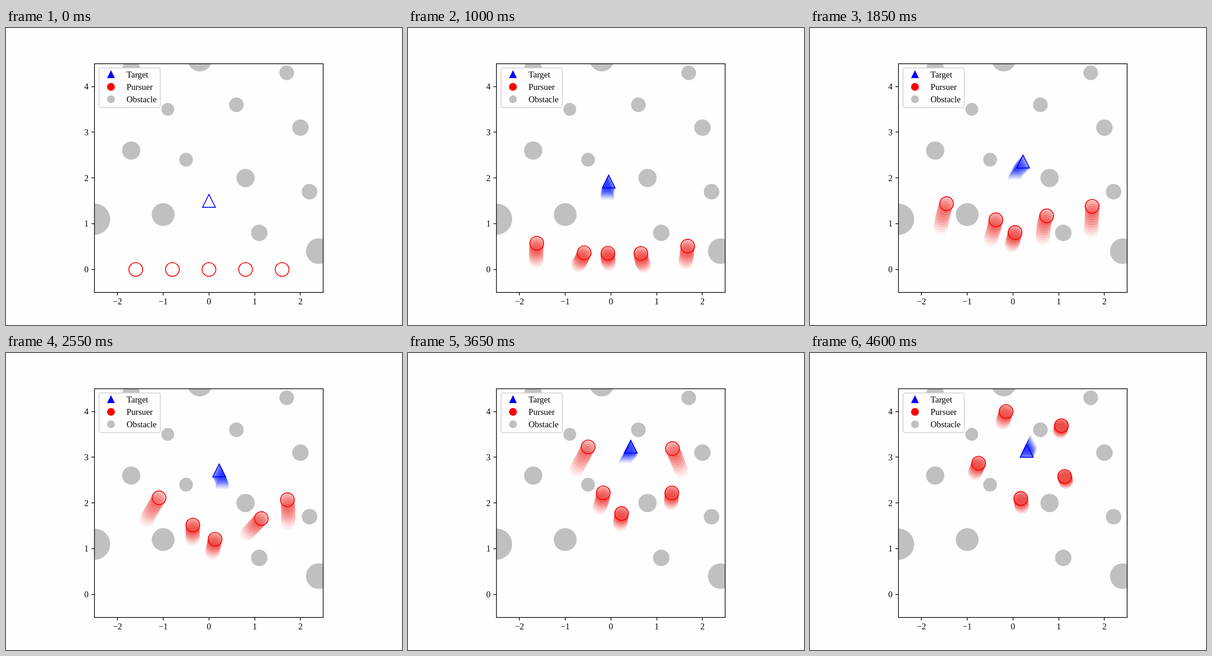
Recreate the animation shown at these times as an HTML page with a canvas. Size 864 by 648 pixels, loop 4.65 s.

```html
<!DOCTYPE html>
<html lang="en">
<head>
<meta charset="utf-8">
<title>Pursuit</title>
<style>
  html, body { margin: 0; width: 100%; height: 100%; overflow: hidden; background: #fefefe; }
  canvas { display: block; }
</style>
</head>
<body>
<canvas id="stage" width="864" height="648"></canvas>
<script>
const ctx = document.getElementById('stage').getContext('2d');

const FRAME_MS = 50, FRAMES = 93, TRAIL = 10, LINE = 1.875;
const CUT = 89, SKIP = 34; // the run jumps ahead at this frame
const LAST_STEP = FRAMES - 1 + SKIP;
const UNIT = 99.792, LEFT = 193, TOP = 78, SIDE = 499;
const GRAY = '#c0c0c0', PAPER = '#fefefe';
const px = x => 442.8 + x * UNIT;
const py = y => 526.82 - y * UNIT;

// Plot units: x, y, radius
const obstacles = [
  [-1, 1.2, .25], [-.5, 2.4, .15], [.8, 2, .2], [1.1, .8, .18], [2.2, 1.7, .17],
  [2, 3.1, .18], [1.7, 4.3, .16], [.6, 3.6, .16], [-.9, 3.5, .14], [-1.7, 2.6, .2],
  [-2.5, 1.1, .34], [2.4, .4, .28], [-.2, 4.6, .27], [-1.7, 4.4, .19]
];

const evader = {
  shape: triangle, size: 14.06, color: '#00f', trailColor: '#0a1eff', opacity: .28,
  path: [[0, 1.5], [-.08, 1.77], [.04, 2.14], [.29, 2.48], [.2, 2.84],
    [.42, 3.18], [.41, 3.36], [.41, 3.4], [.41, 3.4], [.3, 3.14]]
};

// Key points that follow each pursuer's start on the baseline
const pursuers = [
  [[-1.63, .49], [-1.47, 1.39], [-1.01, 2.26], [-.52, 3.18], [-.22, 3.88], [-.27, 3.64], [-.15, 4]],
  [[-.61, .3], [-.38, 1.05], [-.34, 1.61], [-.17, 2.19], [-.25, 2.71], [-.82, 2.54], [-.75, 2.87]],
  [[-.07, .31], [.04, .78], [.15, 1.29], [.23, 1.75], [.23, 1.99], [.21, 1.82], [.17, 2.1]],
  [[.66, .28], [.72, 1.13], [1.21, 1.75], [1.33, 2.2], [1.25, 2.5], [1.19, 2.4], [1.13, 2.58]],
  [[1.67, .43], [1.73, 1.33], [1.69, 2.22], [1.36, 3.15], [1.12, 3.66], [1.02, 3.5], [1.06, 3.69]]
].map((points, i) => ({
  shape: circle, size: 15, color: '#f00', trailColor: '#eb1a14', opacity: .2,
  path: [[.8 * (i - 2), 0], ...points]
}));

// Smooth curve through key points spread evenly over the run, starting from rest
function position(path, step) {
  const last = path.length - 1, t = step / LAST_STEP * last;
  const i = Math.min(Math.floor(t), last - 1), u = t - i, w = 1 - u;
  const tangent = (k, axis) => {
    if (k === 0) return 0;
    if (k === last) return path[k][axis] - path[k - 1][axis];
    return (path[k + 1][axis] - path[k - 1][axis]) / 2;
  };
  return [0, 1].map(axis =>
    path[i][axis] * w * w * (1 + 2 * u) + path[i + 1][axis] * u * u * (3 - 2 * u)
    + u * w * (w * tangent(i, axis) - u * tangent(i + 1, axis)));
}

function circle(x, y, r) {
  ctx.beginPath();
  ctx.arc(x, y, r, 0, 2 * Math.PI);
}

function triangle(x, y, r) {
  ctx.beginPath();
  ctx.moveTo(x, y - r);
  ctx.lineTo(x - r, y + r);
  ctx.lineTo(x + r, y + r);
  ctx.closePath();
}

function fill(color) {
  ctx.fillStyle = color;
  ctx.fill();
}

function stroke(color, width = LINE) {
  ctx.strokeStyle = color;
  ctx.lineWidth = width;
  ctx.stroke();
}

function text(label, x, y, align) {
  ctx.fillStyle = '#000';
  ctx.textAlign = align;
  ctx.fillText(label, x, y);
}

function drawObstacles() {
  ctx.save();
  ctx.beginPath();
  ctx.rect(LEFT, TOP, SIDE, SIDE);
  ctx.clip();
  for (const [x, y, r] of obstacles) {
    circle(px(x), py(y), r * UNIT);
    fill(GRAY);
  }
  ctx.restore();
}

function drawAxes() {
  const bottom = TOP + SIDE;
  ctx.beginPath();
  ctx.rect(LEFT, TOP, SIDE, SIDE);
  for (let v = -2; v <= 2; v++) {
    const x = Math.round(px(v));
    ctx.moveTo(x, bottom);
    ctx.lineTo(x, bottom + 6.5);
    text(String(v).replace('-', '\u2212'), px(v), 603, 'center');
  }
  for (let v = 0; v <= 4; v++) {
    const y = Math.round(py(v));
    ctx.moveTo(LEFT, y);
    ctx.lineTo(LEFT - 6.5, y);
    text(v, 180.2, py(v) + 6.3, 'right');
  }
  stroke('#000', 1.5);
}

function drawLegend() {
  ctx.beginPath();
  ctx.roundRect(203, 87.2, 133.6, 86.6, 3.75);
  fill(PAPER);
  stroke('#d5d5d5');
  triangle(229, 101.2, 7);
  fill('#00f');
  stroke('#00f');
  ['#f00', GRAY].forEach((color, i) => {
    circle(229, 128.5 + 27 * i, 8.5);
    fill(color);
  });
  ['Target', 'Pursuer', 'Obstacle'].forEach((s, i) => text(s, 263, 108 + 27 * i, 'left'));
}

function drawAgent({ shape, size, color, trailColor, opacity, path }, now) {
  const outline = step => {
    const [x, y] = position(path, step);
    shape(px(x), py(y), size);
  };
  for (let age = Math.min(TRAIL, now - 1); age >= 0; age--) {
    ctx.globalAlpha = opacity * (1 - .8 * age / TRAIL);
    outline(now - age);
    fill(trailColor);
    stroke(trailColor);
  }
  ctx.globalAlpha = 1;
  outline(now);
  stroke(color);
}

function draw(frame) {
  ctx.fillStyle = PAPER;
  ctx.fillRect(0, 0, 864, 648);
  ctx.font = '18.75px "Liberation Serif", "Times New Roman", serif';
  drawObstacles();
  const step = frame < CUT ? frame : frame + SKIP;
  for (const agent of [evader, ...pursuers]) drawAgent(agent, step);
  drawAxes();
  drawLegend();
}

const start = performance.now();
function tick() {
  draw(Math.floor((performance.now() - start) / FRAME_MS) % FRAMES);
  requestAnimationFrame(tick);
}
tick();
</script>
</body>
</html>
```
